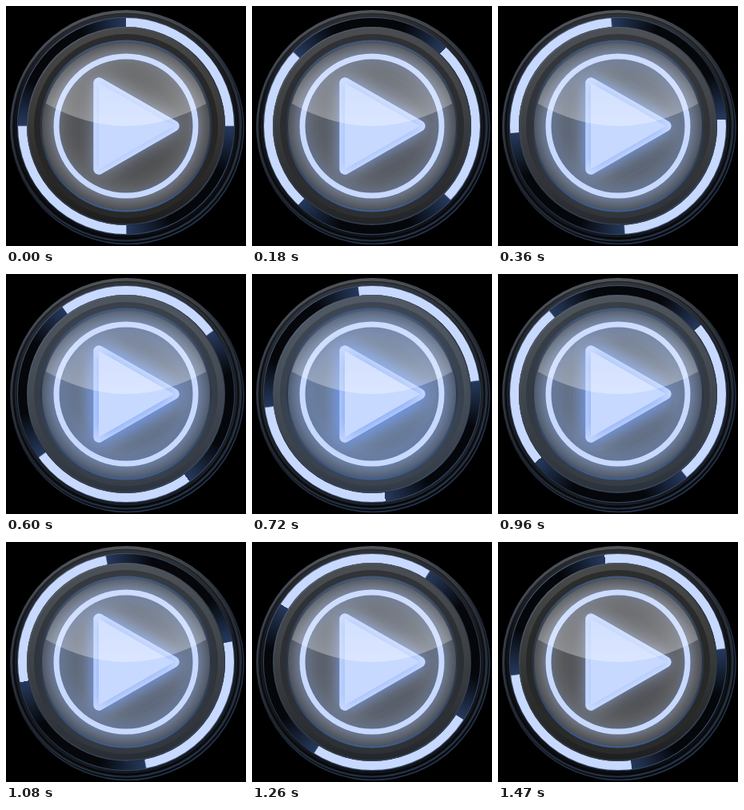
An HTML page with a canvas that plays this animation: 300x300 px, repeating every 1500 ms.

```html
<!DOCTYPE html>
<html lang="en">
<head>
<meta charset="utf-8">
<title>Play button</title>
<style>
html, body { margin: 0; width: 100%; height: 100%; overflow: hidden; background: #000; }
canvas { display: block; }
</style>
</head>
<body>
<canvas id="stage" width="300" height="300"></canvas>
<script>
const ctx = document.getElementById('stage').getContext('2d');
const TAU = Math.PI * 2, LOOP = 1500, STEP = 30, C = 150;
const PALE = '#c8d9ff';

function stops(gradient, list) {
  list.forEach(([at, color]) => gradient.addColorStop(at, color));
  return gradient;
}
const vertical = (y0, y1, ...list) => stops(ctx.createLinearGradient(0, y0, 0, y1), list);
const diagonal = (...list) => stops(ctx.createLinearGradient(70, 30, 230, 270), list);
const radial = (r0, r1, ...list) => stops(ctx.createRadialGradient(C, C, r0, C, C, r1), list);

function disc(r, fill, x = C, y = C) {
  ctx.fillStyle = fill;
  ctx.beginPath();
  ctx.arc(x, y, r, 0, TAU);
  ctx.fill();
}

function ring(r, width, stroke, x = C, y = C) {
  ctx.strokeStyle = stroke;
  ctx.lineWidth = width;
  ctx.beginPath();
  ctx.arc(x, y, r, 0, TAU);
  ctx.stroke();
}

function glowing(color, blur, draw) {
  ctx.save();
  ctx.shadowColor = color;
  ctx.shadowBlur = blur;
  draw();
  ctx.restore();
}

function drawRim(pulse) {
  disc(146, '#07090d', 152, 152);
  ring(145.5, 1.5, diagonal([0, '#15181d'], [1, '#26364f']), 151.5, 152);
  disc(145, vertical(5, 295, [0, '#565656'], [0.3, '#2b2f35'], [1, '#111419']));
  disc(141.5, vertical(8, 292, [0, '#292a2c'], [0.4, '#0b0d10'], [1, '#050608']));
  ring(143.5, 1.2, diagonal([0, '#485468'], [0.5, '#242c38'], [1, '#2b3d58']));
  ring(138, 3, `rgba(70,85,108,${0.1 + 0.25 * pulse})`);
  ring(135.5, 1.5, diagonal([0, '#46576f'], [0.5, '#222a36'], [1, '#354b6c']));
}

function drawSpinner(angle) {
  const conic = ctx.createConicGradient(angle - Math.PI / 2, C, C);
  for (const half of [0, 0.5]) {
    stops(conic, [
      [half, PALE], [half + 0.249, PALE],
      [half + 0.251, '#26395c'], [half + 0.32, '#05070b'],
      [half + 0.43, '#05070b'], [half + 0.499, '#26395c']
    ]);
  }
  ring(129.5, 11, conic);
}

function drawBody(pulse) {
  disc(124, diagonal([0, '#596373'], [0.5, '#30353d'], [1, '#34455f']));
  disc(122.5, vertical(28, 272, [0, '#484848'], [0.45, '#393939'], [1, '#1d1d1e']));
  disc(115, vertical(35, 265, [0, '#2c2c2c'], [0.5, '#252525'], [1, '#292929']));
  disc(123, `rgba(105,135,175,${0.28 * pulse})`);
  ring(106, 3, vertical(44, 256, [0, '#42587c'], [0.5, '#29323f'], [1, '#3e5c8d']));
  disc(105, radial(20, 105, [0, '#393a3c'], [0.5, '#505153'], [0.85, '#6c6d70'], [1, '#4b4e53']));
  disc(105, radial(20, 105,
    [0, `rgba(115,155,230,${0.65 * pulse})`],
    [0.65, `rgba(125,155,205,${0.5 * pulse})`],
    [1, `rgba(95,125,170,${0.25 * pulse})`]));
}

function triangle() {
  ctx.beginPath();
  ctx.moveTo(116, 96);
  ctx.lineTo(210, 150);
  ctx.lineTo(116, 204);
  ctx.closePath();
  ctx.lineJoin = 'round';
  ctx.lineWidth = 13;
  ctx.fillStyle = ctx.strokeStyle = PALE;
  ctx.stroke();
  ctx.fill();
}

function drawIcon(pulse) {
  const glow = `rgba(90,140,240,${0.3 + 0.65 * pulse})`;
  glowing(glow, 10 + 14 * pulse, () => ring(87, 7, PALE));
  glowing(`rgba(190,205,235,${0.45 + 0.2 * pulse})`, 26, triangle);
  glowing(glow, 8 + 14 * pulse, triangle);
}

function drawGloss() {
  const side = Math.asin(28 / 104);
  ctx.beginPath();
  ctx.arc(C, C, 104, Math.PI + side, -side);
  ctx.quadraticCurveTo(C, 178, 50, 122);
  ctx.fillStyle = vertical(46, 150, [0, 'rgba(255,255,255,0.03)'], [1, 'rgba(255,255,255,0.34)']);
  ctx.fill();
}

function frame(now) {
  const time = Math.floor(now % LOOP / STEP) * STEP;
  const phase = time / LOOP;
  const pulse = 1 - Math.abs(1 - 2 * phase);
  ctx.clearRect(0, 0, 300, 300);
  drawRim(pulse);
  drawSpinner(phase * TAU);
  drawBody(pulse);
  drawIcon(pulse);
  drawGloss();
  requestAnimationFrame(frame);
}
requestAnimationFrame(frame);
</script>
</body>
</html>
```
